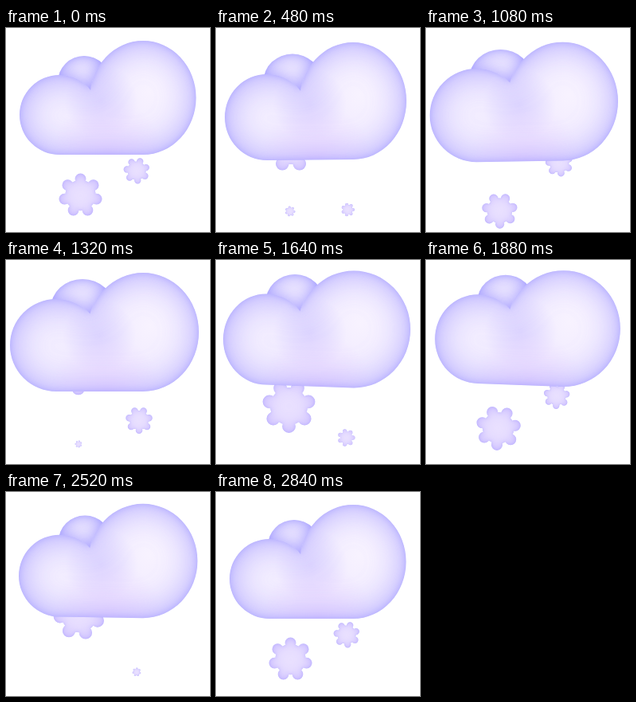
Animation of 256x256 px, one loop 2880 ms. Source, as an HTML page with a canvas:

```html
<!DOCTYPE html>
<html lang="en">
<head>
<meta charset="utf-8">
<title>Snow cloud</title>
<style>
  html, body { margin: 0; width: 100%; height: 100%; overflow: hidden; background: #fff; }
  canvas { display: block; width: 256px; height: 256px; }
</style>
</head>
<body>
<canvas id="stage"></canvas>
<script>
const SIZE = 256, PAD = 48, LOOP = 2880, CYCLE = 2840, STEP = 40;
const dpr = window.devicePixelRatio || 1;

function makeContext(canvas, size) {
  canvas.width = canvas.height = Math.round(size * dpr);
  return canvas.getContext('2d');
}
const stage = makeContext(document.getElementById('stage'), SIZE);
const layer = makeContext(document.createElement('canvas'), SIZE + 2 * PAD);
const mask = makeContext(document.createElement('canvas'), SIZE + 2 * PAD);

// time, then x, y, rx, ry of the left, right and back lobes
const cloudPoses = [
  [0, 67, 109, 50, 50, 172, 87.5, 66.5, 71.5, 98, 68, 33, 33],
  [480, 64, 112, 53, 54, 172, 91.5, 67, 73.5, 96, 67, 36.5, 34.5],
  [800, 64, 111.5, 58, 58.5, 171, 93, 69, 74, 92, 66, 38, 36],
  [1320, 63, 107, 58, 58, 172, 90.5, 70, 74.5, 96, 61, 40, 37],
  [1640, 63, 99.5, 54, 57, 173, 87, 71, 73.5, 99, 54, 37, 36],
  [2120, 67, 100.5, 54, 54.5, 172, 86, 71, 72.5, 100, 53.5, 34.5, 32]
];
const shift = (row, by) => [row[0] + by, ...row.slice(1)];
const cloudKeys = [
  shift(cloudPoses[5], -CYCLE), ...cloudPoses,
  shift(cloudPoses[0], CYCLE), shift(cloudPoses[1], CYCLE)
];

// turn: reference time, angle in degrees, degrees per ms; keys: time, x, y, radius
const flakes = [
  { turn: [2840, -90, -0.02], keys: [
    [2340, 92, 122, 33], [2600, 92, 168, 32], [2720, 93, 192, 30.5], [2840, 93.5, 210, 27.5],
    [2990, 94, 219, 23.5], [3320, 93, 230, 6.5], [3440, 93, 231, 0]] },
  { turn: [480, -90, -0.044], keys: [
    [360, 94, 122, 33], [480, 94, 148, 33], [640, 94, 186, 32], [800, 94.5, 214, 30.5],
    [960, 94, 225, 28], [1120, 92, 230, 20], [1320, 91, 231, 4.5], [1380, 91, 231, 0]] },
  { turn: [1640, -115.7, 0.02], keys: [
    [1200, 88, 120, 33], [1320, 88, 136.5, 33], [1640, 91.5, 183.5, 33.5],
    [1840, 91, 208, 30], [2120, 89, 220, 14], [2320, 88, 224, 0]] },
  { turn: [2840, -70, 0.04], keys: [
    [2440, 164, 130, 16], [2840, 164, 179, 16.5], [3080, 165, 207, 15],
    [3320, 165.5, 228, 8.5], [3460, 165, 236, 0]] },
  { turn: [1320, -64.3, 0.04], keys: [
    [880, 167, 140, 17], [1320, 167, 201, 17], [1640, 163.5, 223, 11], [1840, 163, 233, 0]] },
  { turn: [2120, -103, 0.04], keys: [
    [1640, 164, 138, 16], [2120, 164, 200, 16], [2440, 164, 222, 9], [2620, 164, 230, 0]] }
];

// Smooth curve through timed rows; null outside their span.
function sample(keys, t) {
  const last = keys.length - 1;
  if (t < keys[0][0] || t >= keys[last][0]) return null;
  const i = keys.findIndex((row, n) => n < last && t < keys[n + 1][0]);
  const a = keys[i], b = keys[i + 1], span = b[0] - a[0], u = (t - a[0]) / span;
  const slope = (n, k) => {
    const p = keys[Math.max(0, n - 1)], q = keys[Math.min(last, n + 1)];
    return (q[k] - p[k]) / (q[0] - p[0]) * span;
  };
  return a.slice(1).map((value, n) => {
    const k = n + 1, rise = u * u * (3 - 2 * u);
    return value + (b[k] - value) * rise
      + slope(i, k) * u * (1 - u) ** 2 - slope(i + 1, k) * u * u * (1 - u);
  });
}

function addEllipse(path, x, y, rx, ry = rx) {
  path.moveTo(x + rx, y);
  path.ellipse(x, y, rx, ry, 0, 0, 2 * Math.PI);
}

function reset(ctx) {
  const size = SIZE + 2 * PAD;
  ctx.setTransform(dpr, 0, 0, dpr, 0, 0);
  ctx.globalCompositeOperation = 'source-over';
  ctx.clearRect(0, 0, size, size);
  return size;
}

// Fill a shape, then darken it inwards from its rim. Each rim is [blur, colour].
function drawSoft(path, rims, paint) {
  const size = reset(mask);
  mask.fillStyle = '#b5afff';
  mask.fillRect(0, 0, size, size);
  mask.translate(PAD, PAD);
  mask.globalCompositeOperation = 'destination-out';
  mask.fill(path);

  reset(layer);
  layer.translate(PAD, PAD);
  layer.fillStyle = '#eee8ff';
  layer.fill(path);
  layer.globalCompositeOperation = 'source-atop';
  if (paint) paint(layer);
  for (const [blur, color] of rims) {
    layer.save();
    layer.shadowBlur = blur * dpr;
    layer.shadowColor = color;
    layer.drawImage(mask.canvas, -PAD, -PAD, size, size);
    layer.restore();
  }
  stage.drawImage(layer.canvas, -PAD, -PAD, size, size);
}

function glow(ctx, x, y, radius, rgb, alpha) {
  const gradient = ctx.createRadialGradient(x, y, 0, x, y, radius);
  gradient.addColorStop(0, `rgba(${rgb},${alpha})`);
  gradient.addColorStop(0.5, `rgba(${rgb},${alpha * 0.55})`);
  gradient.addColorStop(1, `rgba(${rgb},0)`);
  ctx.fillStyle = gradient;
  ctx.fillRect(0, 0, SIZE, SIZE);
}

function drawFlake({ turn, keys }, t) {
  const pose = sample(keys, t);
  if (!pose || pose[2] < 0.5) return;
  const [x, y, r] = pose;
  const start = (turn[1] + (t - turn[0]) * turn[2]) * Math.PI / 180;
  const path = new Path2D();
  addEllipse(path, x, y, r * 0.7);
  for (let i = 0; i < 7; i++) {
    const angle = start + i * 2 * Math.PI / 7;
    addEllipse(path, x + Math.cos(angle) * r * 0.75, y + Math.sin(angle) * r * 0.75, r * 0.25);
  }
  const rims = [[r * 0.55, 'rgba(176,158,255,.6)'], [r * 0.14, 'rgba(166,155,255,.55)']];
  drawSoft(path, rims, ctx => {
    ctx.fillStyle = '#e9e0ff';
    ctx.fillRect(0, 0, SIZE, SIZE);
  });
}

function drawCloud(t) {
  const pose = sample(cloudKeys, t);
  const left = pose.slice(0, 4), right = pose.slice(4, 8), back = pose.slice(8);
  const [lx, ly, , lry] = left, [rx, ry, , rry] = right;

  const front = new Path2D();
  addEllipse(front, ...left);
  addEllipse(front, ...right);
  front.moveTo(lx, ly);
  front.lineTo(rx, ry);
  front.lineTo(rx, ry + rry);
  front.lineTo(lx, ly + lry);
  front.closePath();

  const rear = new Path2D();
  addEllipse(rear, ...back);
  drawSoft(rear, [[22, 'rgba(150,142,255,.7)'], [7, 'rgba(150,146,255,.5)']], ctx => {
    ctx.save();
    ctx.shadowBlur = 20 * dpr;
    ctx.shadowColor = 'rgba(160,152,255,.9)';
    ctx.fill(front);
    ctx.restore();
  });

  drawSoft(front, [[40, 'rgba(158,148,255,.72)'], [9, 'rgba(152,148,255,.55)']], ctx => {
    glow(ctx, rx + 8, ry - 8, 70, '250,245,255', 0.8);
    glow(ctx, lx, ly, 46, '244,239,255', 0.7);
    glow(ctx, (lx + rx) / 2, ry + 5, 46, '206,196,255', 0.55);
    glow(ctx, (lx + rx) / 2 + 8, ry + rry, 70, '232,212,255', 0.7);
  });
}

function draw(now) {
  const t = Math.min(CYCLE, Math.floor(now % LOOP / STEP) * STEP) % CYCLE;
  stage.setTransform(dpr, 0, 0, dpr, 0, 0);
  stage.fillStyle = '#fff';
  stage.fillRect(0, 0, SIZE, SIZE);
  for (const flake of flakes) {
    drawFlake(flake, t);
    drawFlake(flake, t + CYCLE);
  }
  drawCloud(t);
}

const began = performance.now();
function tick() {
  draw(performance.now() - began);
  requestAnimationFrame(tick);
}
tick();
</script>
</body>
</html>
```
